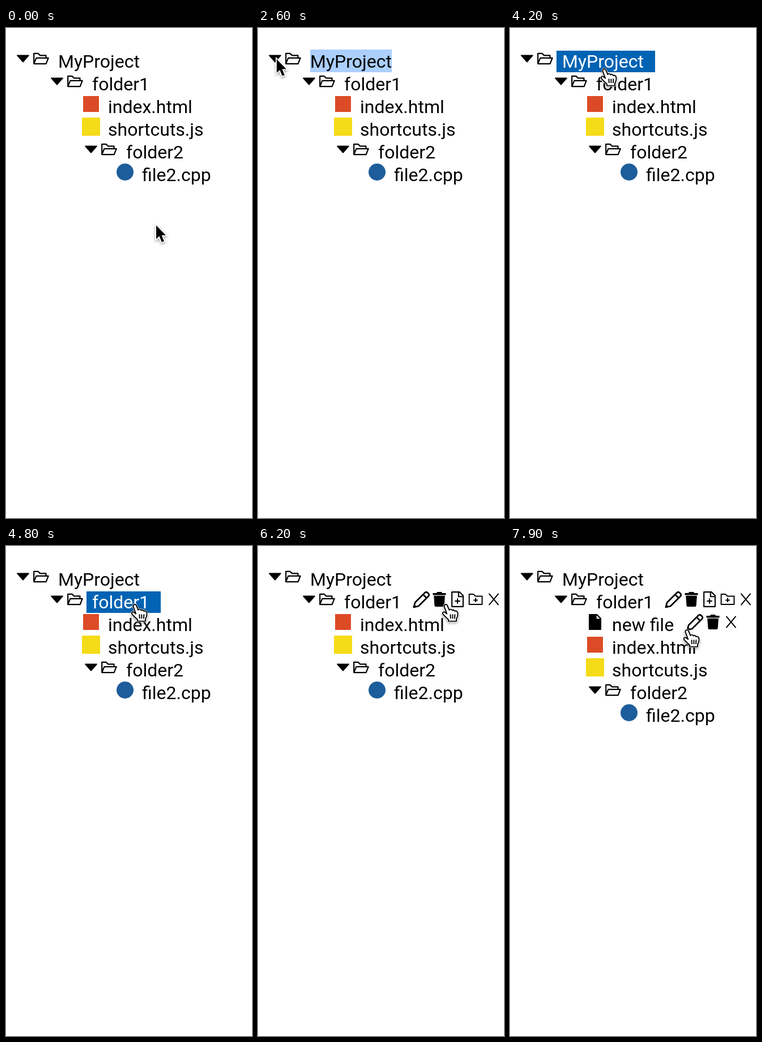
Recreate the animation shown at these times as an HTML page with a canvas. Size 434 by 864 pixels, loop 8 s.

```html
<!DOCTYPE html>
<html lang="en">
<head>
<meta charset="utf-8">
<title>File tree</title>
<style>
  html, body { margin: 0; width: 100%; height: 100%; overflow: hidden; background: #fff; }
  canvas { display: block; }
</style>
</head>
<body>
<canvas id="stage" width="434" height="864"></canvas>
<script>
const ctx = document.getElementById('stage').getContext('2d');
const LOOP = 8000, STEP = 100, ROW = 40;
const FONT = '32px Roboto, Arial, sans-serif';
const HOVER = '#0063b4', SELECTION = '#accffd';

const ease = {
  in: u => u * u,
  out: u => 1 - (1 - u) * (1 - u),
  both: u => u * u * (3 - 2 * u),
  line: u => u
};

// Pointer keys: time, x, y, easing towards this key
const route = [
  [0, 265, 348],
  [300, 162, 326, 'out'],
  [500, 162, 326],
  [1300, 55, 74, 'both'],
  [1400, 45, 69, 'out'],
  [1700, 33, 55, 'out'],
  [3800, 33, 55],
  [4200, 167, 71, 'in'],
  [4700, 215, 102, 'out'],
  [5100, 245, 102, 'out'],
  [5500, 245, 102],
  [5600, 246, 102, 'line'],
  [6400, 348, 102, 'both'],
  [6700, 353, 102, 'out'],
  [7100, 353, 102],
  [7500, 288, 142, 'both'],
  [7600, 288, 142],
  [7900, 313, 147, 'both']
];

const p = d => new Path2D(d);

// Icons on a 32 px grid: stroked unless width is missing
const icons = {
  down: { fill: p('M5.9 9.4H26.1Q27.6 9.6 26.6 11L16.8 22.2Q16 22.9 15.2 22.2L5.4 11Q4.4 9.6 5.9 9.4Z') },
  right: { fill: p('M9.4 5.9V26.1Q9.6 27.6 11 26.6L22.2 16.8Q22.9 16 22.2 15.2L11 5.4Q9.6 4.4 9.4 5.9Z') },
  open: { line: p('M3.2 25.1V6.9H10.5L14.2 10.4H24.5V15M3.2 25.1L7.4 14.9H28.7L24.7 25.1Z'), width: 2.2 },
  closed: { line: p('M4.6 6.9H12L15.7 10.4H27.4V25.1H4.6Z'), width: 2.2 },
  addFolder: { line: p('M4.6 6.9H12L15.7 10.4H27.4V25.1H4.6ZM12.2 17.4H19.8M16 13.6V21.1'), width: 2 },
  addFile: { line: p('M6.1 3.1H19.4L25.9 9.6V28.9H6.1ZM17.8 3.1V11.2H25.9M11.4 19.1H20.6M16 14.5V23.7'), width: 2.1 },
  close: { line: p('M24.4 5.8L7.5 26.2M7.5 5.8L24.4 26.2'), width: 2 },
  pen: {
    line: p('M2.8 30L5 21.8L22.3 4.5Q24.8 2 27.3 4.5L28.5 5.7Q31 8.2 28.5 10.7L11.2 28Z M19.3 7.6L25.4 13.7'),
    fill: p('M2.5 30.4L4 25L8 29Z'), width: 2.7
  },
  trash: { fill: p('M4.5 5H11L12 3H20L21 5H27.5V8.4H4.5ZM6.2 9.8H25.8L24.6 27Q24.4 29 22.4 29H9.6Q7.6 29 7.4 27Z') },
  file: { fill: p('M6 2H19.8L27 9.2V29Q27 30 26 30H6Q5 30 5 29V3Q5 2 6 2ZM18.8 4.3V10.2H24.7Z') },
  html: { fill: p('M2 2H30V30H2Z'), color: '#dc4b26' },
  js: { fill: p('M0 0H32V32H0Z'), color: '#f5dc18' },
  cpp: { fill: p('M1 16A15 15 0 1 0 31 16A15 15 0 1 0 1 16Z'), color: '#1d5d9b' }
};

const arrow = p('M0 0V24L5.4 19L9.8 29.6L13.9 27.9L9.6 17.6H17Z');
const hand = p('M-3.4 5.2C-4.6 1.6 .2 -.6 2 3L5.4 10.8C7 9 9.6 9.4 10.4 11.4C12 10.2 14.4 10.8 15 12.8' +
  'C17.4 11.8 19.6 13.2 20.2 15.6C21.2 19.6 20.4 22.4 18 26.4V30.6H4V28C1 24.6 -3.6 21.4 -6 17.4' +
  'C-7 14.6 -3.8 13.2 -1.6 15.2L1.2 17.6Z');
const creases = p('M7.4 18.4L7.8 26M11.4 18.4V26M15.4 18.4L15 26');

const MAIN_TOOLS = ['pen', 'trash', 'addFile', 'addFolder', 'close'];
const FILE_TOOLS = ['pen', 'trash', 'close'];

function drawIcon(name, x, y) {
  const icon = icons[name];
  ctx.save();
  ctx.translate(x, y);
  ctx.fillStyle = icon.color || '#000';
  ctx.strokeStyle = '#000';
  ctx.lineJoin = 'round';
  if (icon.fill) ctx.fill(icon.fill, 'evenodd');
  if (icon.line) {
    ctx.lineWidth = icon.width;
    ctx.stroke(icon.line);
  }
  ctx.restore();
}

function pointerAt(t) {
  let i = 0;
  while (i < route.length - 1 && route[i + 1][0] <= t) i++;
  const a = route[i], b = route[i + 1] || a;
  const u = b === a ? 0 : ease[b[3] || 'line']((t - a[0]) / (b[0] - a[0]));
  return { x: a[1] + (b[1] - a[1]) * u, y: a[2] + (b[2] - a[2]) * u };
}

function rowsAt(t) {
  const shut = (t >= 1900 && t < 2100) || (t >= 2900 && t < 3400);
  const rows = [{ name: 'MyProject', depth: 0, folder: true, shut, marked: t >= 2000 && t < 2700 }];
  if (shut) return rows;
  rows.push({ name: 'folder1', depth: 1, folder: true, tools: t >= 5300 && MAIN_TOOLS });
  if (t >= 6900) rows.push({ name: 'new file', depth: 2, icon: 'file', tools: t >= 7600 && FILE_TOOLS });
  rows.push(
    { name: 'index.html', depth: 2, icon: 'html' },
    { name: 'shortcuts.js', depth: 2, icon: 'js' },
    { name: 'folder2', depth: 2, folder: true },
    { name: 'file2.cpp', depth: 3, icon: 'cpp' }
  );
  return rows;
}

const inside = (pt, x, y, w, h) => pt.x >= x && pt.x < x + w && pt.y >= y && pt.y < y + h;

// Draws one row and tells whether the pointer is on something clickable
function drawRow(row, index, pt) {
  const x = 14 + row.depth * 60, y = 38 + index * ROW;
  const textX = x + (row.folder ? 78 : 46);
  const width = ctx.measureText(row.name).width;
  const hover = inside(pt, textX - 10, y + 2, width + 30, 38);
  let active = hover;

  if (row.folder) {
    drawIcon(row.shut ? 'right' : 'down', x, y);
    drawIcon(row.shut ? 'closed' : 'open', x + 32, y);
  } else {
    drawIcon(row.icon, x, y);
  }
  if (hover) {
    ctx.fillStyle = HOVER;
    ctx.fillRect(textX - 10, y + 2, Math.round(width + 30), 38);
  } else if (row.marked) {
    ctx.fillStyle = SELECTION;
    ctx.fillRect(textX, y, Math.round(width), ROW);
  }
  ctx.fillStyle = hover ? '#fff' : '#000';
  ctx.fillText(row.name, textX, y + 32);

  if (row.tools) {
    const left = row.depth === 1 ? 272 : 310;
    row.tools.forEach((name, i) => drawIcon(name, left + i * 32, y));
    active = active || inside(pt, left, y, row.tools.length * 32, 34);
  }
  return active;
}

function drawPointer(pt, active) {
  ctx.save();
  ctx.translate(Math.round(pt.x), Math.round(pt.y));
  ctx.strokeStyle = '#fff';
  ctx.shadowColor = 'rgba(0,0,0,.4)';
  ctx.shadowBlur = 4;
  ctx.shadowOffsetY = 2;
  ctx.lineJoin = active ? 'round' : 'miter';
  ctx.lineWidth = 3.4;
  ctx.stroke(active ? hand : arrow);
  ctx.shadowColor = 'transparent';
  ctx.fillStyle = active ? '#fff' : '#000';
  ctx.fill(active ? hand : arrow);
  if (active) {
    ctx.strokeStyle = '#000';
    ctx.lineWidth = 1.9;
    ctx.stroke(hand);
    ctx.stroke(creases);
  }
  ctx.restore();
}

function draw(now) {
  const t = Math.floor((now % LOOP) / STEP) * STEP;
  const pt = pointerAt(t);
  ctx.fillStyle = '#fff';
  ctx.fillRect(0, 0, 434, 864);
  ctx.font = FONT;
  let active = false;
  rowsAt(t).forEach((row, i) => {
    if (drawRow(row, i, pt)) active = true;
  });
  drawPointer(pt, active);
}

const start = performance.now();
function tick() {
  draw(performance.now() - start);
  requestAnimationFrame(tick);
}
tick();
</script>
</body>
</html>
```
